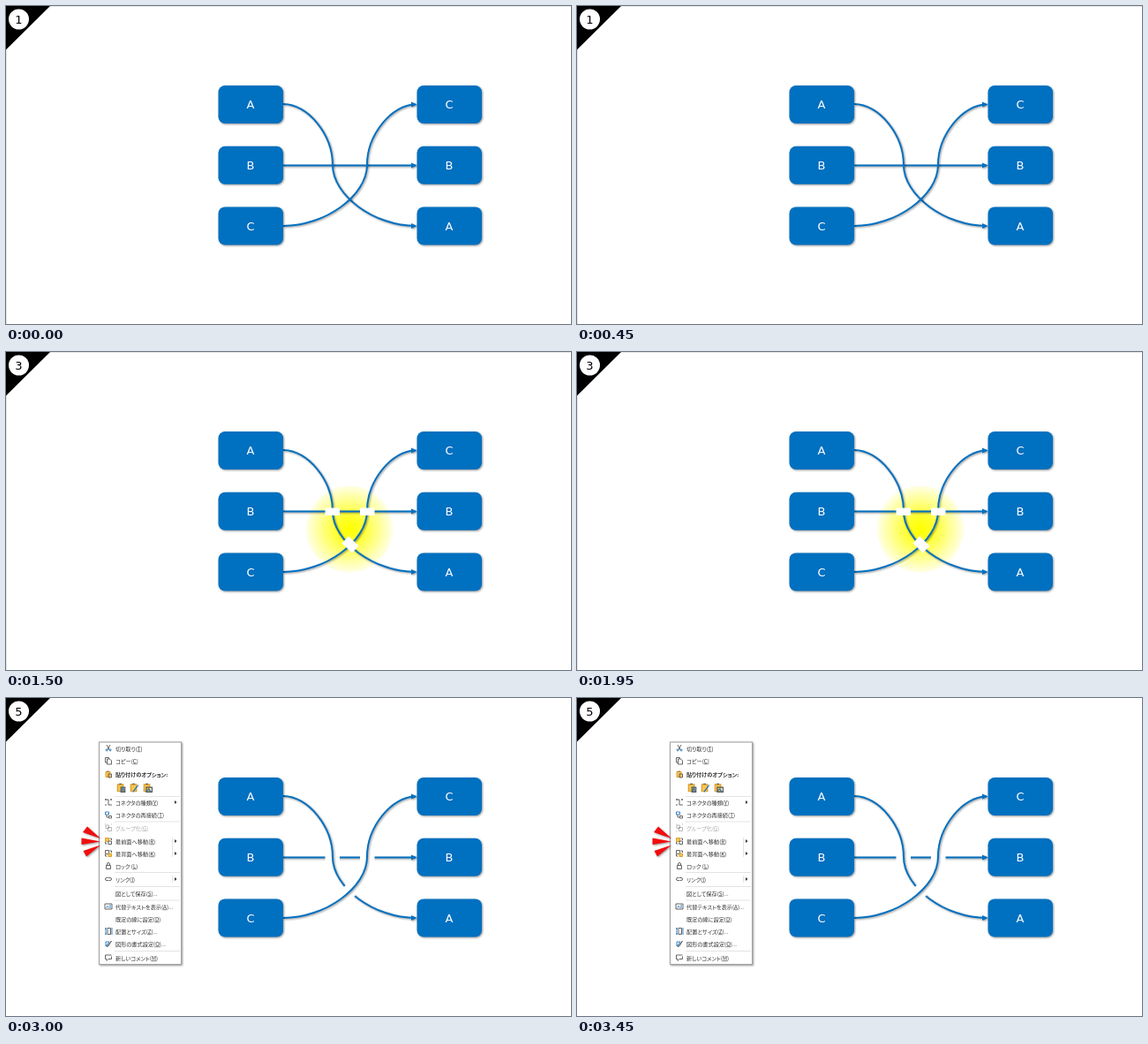
Recreate the animation shown at these times as an HTML page. Size 640 px wide and 360 px high, loop 3.75 s.

```html
<!DOCTYPE html>
<html lang="ja">
<head>
<meta charset="utf-8">
<style>
  html, body { margin: 0; width: 100%; height: 100%; overflow: hidden; background: #fff; }
  svg { display: block; width: 640px; height: 360px; }
  .label { font: 13px "DejaVu Sans", sans-serif; text-anchor: middle; }
  .shadow { filter: drop-shadow(1px 1.5px 1px rgba(0, 0, 0, .42)); }
  .wire { fill: none; stroke: #0070c0; stroke-width: 2; }
  #menu text { font: 6.2px "Noto Sans CJK JP", "Noto Sans CJK", sans-serif; font-feature-settings: "palt"; fill: #333; }
  #menu .bold { font-weight: 700; }
  #menu .off { fill: #aaa; }
  .key { text-decoration: underline; }
  .icon { fill: none; stroke: #555; stroke-width: .9; }
  .blue { stroke: #2374bd; }
  .gold { fill: #f5c54f; stroke: #d99b28; }
</style>
</head>
<body>
<svg viewBox="0 0 640 360">
  <defs>
    <radialGradient id="glow">
      <stop offset="0" stop-color="#ff0"/>
      <stop offset=".3" stop-color="#ffff2e"/>
      <stop offset="1" stop-color="#ffffe6"/>
    </radialGradient>
    <marker id="tip" markerUnits="userSpaceOnUse" markerWidth="8" markerHeight="8" refX="5" refY="4" orient="auto">
      <path d="M0 1L6.5 4L0 7z" fill="#0070c0"/>
    </marker>
    <g id="gapsB"><path d="M361.5 176.5h16.5v8.5h-16.5zM401 176.5h16.5v8.5h-16.5z"/></g>
    <rect id="gapA" x="-8" y="-5.5" width="16" height="11" transform="translate(390 218) rotate(44)"/>
  </defs>

  <path d="M0 .5H640M.5 0V360" stroke="#e4e4e4" data-on="012"/>
  <path d="M0 0H50L0 49.5z"/>
  <circle cx="14.5" cy="15" r="11.5" fill="#fff"/>
  <text id="step" class="label" x="14.5" y="19.8"></text>

  <circle cx="389" cy="200.5" r="49" fill="url(#glow)" data-on="123"/>
  <g class="shadow"><path class="wire" d="M314 180.5H464" marker-end="url(#tip)"/></g>
  <use href="#gapsB" fill="#fff" data-on="4"/>
  <g class="shadow"><path class="wire" d="M314 111C342 111 370 145.5 370 180S417 249 464 249" marker-end="url(#tip)"/></g>
  <use href="#gapA" fill="#fff" data-on="4"/>
  <g class="shadow"><path class="wire" d="M314 249C361.5 249 409 214.5 409 180S437 111.500 464 111.500" marker-end="url(#tip)"/></g>
  <g data-on="1"><use href="#gapsB"/><use href="#gapA"/></g>
  <g data-on="23" fill="#fff"><use href="#gapsB"/><use href="#gapA"/></g>

  <g id="boxes" class="shadow"></g>
  <g id="menu" data-on="34">
    <rect class="shadow" x="105.500" y="50" width="93" height="251.500" fill="#fff" stroke="#a0a0a0"/>
    <path d="M123 111.500H197M123 140H197M123 197.500H197M123 213.500H197M123 229H197M123 286.500H197M188.500 158V180M188.500 201V209" stroke="#dcdcdc" stroke-width=".8"/>
  </g>
  <g class="shadow" data-on="4">
    <path d="M92 145.500L87 152L107 159zM85.500 158.500V166L107 162.500zM87.500 173L91 179.500L107 166.500z" fill="#f20d0d"/>
  </g>
</svg>
<script>
const $ = id => document.getElementById(id);
const add = (parent, html) => parent.insertAdjacentHTML('beforeend', html);

[[240.5, 'ABC'], [465.5, 'CBA']].forEach(([x, names]) => [...names].forEach((name, i) => {
  const y = 90 + i * 68.7;
  add($('boxes'), `<rect x="${x}" y="${y}" width="73.500" height="43" rx="7.500" fill="#0070c0"/>
    <text class="label" x="${x + 36.5}" y="${y + 26.3}" fill="#fff">${name}</text>`);
}));

// Icons sit on an 8 by 8 grid.
const line = (d, cls = '') => `<path class="${cls}" d="${d}"/>`;
const layers = front => line('M.5 .5h4v4h-4z', front ? 'gold' : '') +
  line('M4 4h3.500v3.500h-3.500z', front ? '' : 'gold') + line('M5.500 1h2v2M2.500 7h-2v-2');
const clip = line('M1 1.500h5v6h-5z', 'gold') + line('M2.500 1h2');
const icons = {
  cut: line('M2 0L5 5.500M6 0L3 5.500') + line('M2 5a1 1 0 1 0 .1 0M6 5a1 1 0 1 0 .1 0', 'blue'),
  copy: line('M2.500 6h-2v-5.500h4v1.500M2.500 2h3l2 2v4h-5z'),
  clip: clip + line('M4 4h3.500v4h-3.500z'),
  type: line('M0 1h2M6 1h2M0 7h2M6 7h2M2 1h2v6h2M1 0v2M7 0v2'),
  link: line('M.5 1h4v3h-4z', 'blue') + line('M2 4v3h2M4.500 5.500h3v2.500h-3z'),
  group: line('M1 1h3.500v3.500h-3.500zM3.500 3.500h4v4h-4zM0 0h1M7 0h1M0 8h1'),
  front: layers(true),
  back: layers(false),
  lock: line('M1.500 3.500h5v4h-5zM2.500 3.500v-1.500a1.500 1.500 0 0 1 3 0v1.500'),
  chain: line('M3.500 2.500h-1.500a1.500 1.500 0 0 0 0 3h2M4.500 5.500h1.500a1.500 1.500 0 0 0 0-3h-2'),
  alt: line('M0 1h8v6h-8z') + line('M1.500 5.500l1.500-2l1.500 2M5 3h2M5 5h2', 'blue'),
  size: line('M3 .5h3.500v7h-3.500z') + line('M1 0v8M0 1h2M0 7h2M8 0v8', 'blue'),
  format: line('M1 2h4l-4 5z', 'blue') + line('M7.500 1L3 6l-1 1.500l2-.5z'),
  note: line('M.5 1h7M.5 1v4.500h1.500v2l2-2h3.500v-3')
};
const icon = (art, x, y, scale = 1, opacity = 1) =>
  `<g class="icon" opacity="${opacity}" transform="translate(${x} ${y}) scale(${scale})">${art}</g>`;

// y, label, access key, tail, icon, has submenu
[
  [57, '切り取り', 'T', '', 'cut'],
  [71, 'コピー', 'C', '', 'copy'],
  [86, '貼り付けのオプション:', '', '', 'clip'],
  [118, 'コネクタの種類', 'Y', '', 'type', true],
  [132, 'コネクタの再接続', 'T', '', 'link'],
  [147, 'グループ化', 'G', '', 'group'],
  [162, '最前面へ移動', 'R', '', 'front', true],
  [176, '最背面へ移動', 'K', '', 'back', true],
  [190, 'ロック ', 'L', '', 'lock'],
  [205, 'リンク', 'I', '', 'chain', true],
  [221, '図として保存', 'S', '...'],
  [236, '代替テキストを表示', 'A', '...', 'alt'],
  [250, '既定の線に設定', 'D', ''],
  [264, '配置とサイズ', 'Z', '...', 'size'],
  [278, '図形の書式設定', 'O', '...', 'format'],
  [294, '新しいコメント', 'M', '', 'note']
].forEach(([y, label, key, tail, art, sub]) => {
  const off = key === 'G';
  const access = key && `(<tspan class="key">${key}</tspan>)`;
  add($('menu'), `<text class="${off ? 'off' : key ? '' : 'bold'}" x="124" y="${y + 2.5}">${label}${access}${tail}</text>`);
  if (art) add($('menu'), icon(icons[art], 112, y - 4, 1, off ? .45 : 1));
  if (sub) add($('menu'), `<path d="M191 ${y - 2}l2.500 2l-2.500 2z" fill="#333"/>`);
});

[
  line('M4 4h3.500v4h-3.500z') + line('M4.500 7.500l1.200-3l1.200 3', 'blue'),
  line('M7.500 2L4 6.500l-1 1.500', 'blue'),
  line('M3 4h5v4h-5z') + line('M3 7.500l2-2l2 2', 'blue')
].forEach((art, i) => add($('menu'), icon(clip + art, 125 + i * 15, 96, 1.3)));

const staged = [...document.querySelectorAll('[data-on]')];
function draw() {
  const step = Math.floor(performance.now() % 3750 / 750);
  $('step').textContent = step + 1;
  staged.forEach(el => el.style.display = el.dataset.on.includes(step) ? '' : 'none');
  requestAnimationFrame(draw);
}
draw();
</script>
</body>
</html>
```
